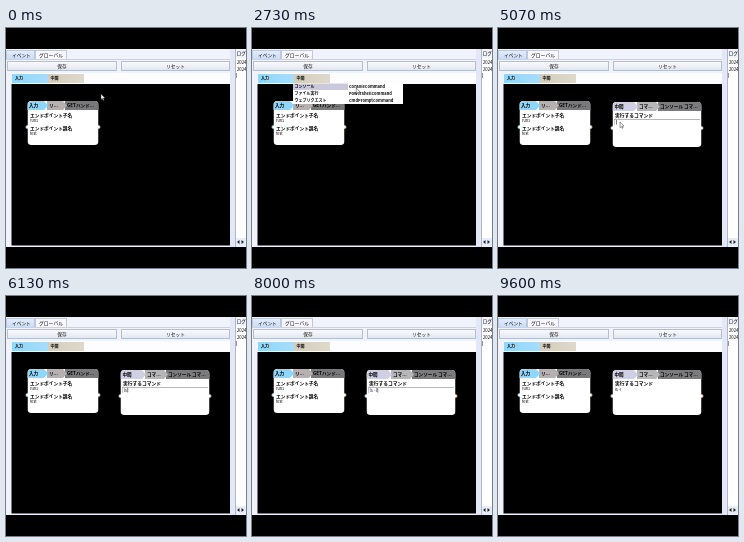
Recreate the animation shown at these times as an HTML page with a canvas. Size 240 by 240 pixels, loop 9670 ms.

```html
<!DOCTYPE html>
<html lang="ja">
<head>
<meta charset="utf-8">
<style>
html, body { margin: 0; width: 100%; height: 100%; overflow: hidden; background: #000; }
canvas { display: block; width: 240px; height: 240px; }
</style>
</head>
<body>
<canvas id="stage" width="240" height="240"></canvas>
<script>
const ctx = document.getElementById('stage').getContext('2d');
const LOOP = 9670;
const FONT = '"Noto Sans CJK JP", "Noto Sans CJK", "Noto Sans", sans-serif';

// Times in ms at which the interface changes.
const MENU_OPEN = 1130, SUBMENU_OPEN = 2130, NODE_ADDED = 3200, EDIT_START = 5000, EDIT_END = 8530;
const KEYS = [[5600, 'l'], [5870, 's'], [6730, ' '], [7070, '-'], [7470, 'l']];
const POINTER = [
  [0, 95, 66], [400, 95, 66], [1000, 52, 51], [1200, 52, 51], [1500, 50, 61], [2000, 54, 59],
  [2500, 104, 60], [3200, 105, 60], [3900, 117, 79], [4500, 117, 79], [5000, 122, 94], [5500, 122, 94]
];

function box(x, y, w, h, fill, stroke) {
  ctx.fillStyle = fill;
  ctx.fillRect(x, y, w, h);
  if (stroke) {
    ctx.strokeStyle = stroke;
    ctx.lineWidth = 1;
    ctx.strokeRect(x + .5, y + .5, w - 1, h - 1);
  }
}

function text(str, x, y, size = 4.7, weight = 500, color = '#000', align = 'left') {
  ctx.font = `${weight} ${size}px ${FONT}`;
  ctx.fillStyle = color;
  ctx.textAlign = align;
  ctx.textBaseline = 'alphabetic';
  ctx.fillText(str, x, y);
}

function gradient(x0, y0, x1, y1, from, to) {
  const g = ctx.createLinearGradient(x0, y0, x1, y1);
  g.addColorStop(0, from);
  g.addColorStop(1, to);
  return g;
}

function button(label, x, w) {
  box(x, 33, w, 10, gradient(0, 33, 0, 43, '#fcfcff', '#dfe5ef'), '#b4bfd0');
  text(label, x + w / 2, 39.5, 4.7, 500, '#111', 'center');
}

function scrollArrow(x, dir) {
  ctx.fillStyle = '#222';
  ctx.beginPath();
  ctx.moveTo(x + dir * 1.5, 214);
  ctx.lineTo(x - dir, 212);
  ctx.lineTo(x - dir, 216);
  ctx.fill();
}

function windowFrame(t) {
  box(0, 0, 240, 240, '#000');
  box(0, 21, 240, 198, '#f0f3fb');
  box(0, 22, 29, 10, gradient(0, 22, 0, 32, '#e5efff', '#c9daf2'), '#bac8dd');
  box(29, 22, 32, 10, '#f7f7fd', '#c3c8d6');
  text('イベント', 6, 28.6);
  text('グローバル', 33, 28.6, 4.8);
  box(0, 31, 225, 1, '#c9d2e4');
  button('保存', 1, 110);
  button('リセット', 115, 109);

  box(6, 45, 218, 11, '#fdfdff');
  box(6, 46, 36, 9, gradient(6, 0, 42, 0, '#8ed7fb', '#a8dcfa'));
  const hover = t > 900 && t < 2100;
  box(42, 46, 36, 9, hover ? '#d5d2d4' : gradient(42, 0, 78, 0, '#d3cdbc', '#dfd9cd'));
  text('入力', 9, 51.5, 4, 700);
  text('中間', 44.5, 51.5, 4, 700);
  box(5.5, 56, 218.5, 161.5, '#000');

  box(224, 21, 5, 198, '#e2e8f8');
  box(229, 21, 1, 198, '#aeb7cc');
  text('ログ', 230.5, 26.7, 4.7);
  box(230, 30, 10, 180, '#fff');
  text('2024-', 231, 36, 4.2);
  text('2024-', 231, 43, 4.2);
  box(230, 45, .5, 5, '#333');
  box(230, 210, 10, 8, '#e6ecf8');
  scrollArrow(232.5, -1);
  scrollArrow(236.5, 1);
}

function node(x, y, w, h, parts) {
  for (const [px, color] of [[x, '#9bd4e8'], [x + w, '#e2a888']]) {
    ctx.beginPath();
    ctx.arc(px, y + 26, 1.6, 0, 7);
    ctx.fillStyle = '#fff';
    ctx.fill();
    ctx.strokeStyle = color;
    ctx.lineWidth = .7;
    ctx.stroke();
  }
  ctx.save();
  ctx.beginPath();
  ctx.roundRect(x, y, w, h, 4);
  ctx.clip();
  box(x, y, w, h, '#fff');
  // Each header segment points over the following one.
  for (const [, start, end, color] of [...parts].reverse()) {
    ctx.fillStyle = color;
    ctx.beginPath();
    ctx.moveTo(start, y);
    ctx.lineTo(end - 3, y);
    ctx.lineTo(end + 1, y + 4.5);
    ctx.lineTo(end - 3, y + 9);
    ctx.lineTo(start, y + 9);
    ctx.fill();
  }
  for (const [label, start] of parts) text(label, start + 2, y + 6.4, 4.6, 700);
  ctx.restore();
}

function inputNode() {
  node(21.5, 73, 71, 44, [
    ['入力', 21, 41, '#91d5f8'], ['リ...', 41, 60, '#b7b0b0'], ['GETハンド...', 59, 97, '#79797c']
  ]);
  text('エンドポイント子名', 24, 88.8, 4.7, 700);
  text('run1', 24, 94, 3.8);
  text('エンドポイント親名', 24, 102, 4.7, 700);
  text('test', 24, 107, 3.8);
}

function commandNode(t) {
  node(114.5, 74, 89, 45, [
    ['中間', 114.5, 139, '#d0d0e4'], ['コマ...', 139, 161, '#b6b6b9'], ['コンソール コマ...', 160, 208, '#7b7b7e']
  ]);
  text('実行するコマンド', 117, 89.2, 4.75, 700);
  const typed = KEYS.filter(([at]) => t >= at).map(([, key]) => key).join('');
  if (t < EDIT_START) return;
  if (t >= EDIT_END) {
    text(typed, 117, 95, 3.8);
    return;
  }
  box(116, 91, 86, 6, '#fff');
  box(116, 91, 86, .7, '#9c91b8');
  box(116, 91, .6, 6, '#aaa4c0');
  text(typed, 117.5, 95.8, 4.7, 500, '#333047');
  const caret = 118 + ctx.measureText(typed).width;
  if (t % 1000 < 500) box(caret, 92, .6, 4.5, '#222');
}

function menuItems(items, x, size) {
  items.forEach((item, i) => text(item, x, 60.3 + i * 6.6, size, 700));
}

function menus(t) {
  if (t < MENU_OPEN || t >= NODE_ADDED) return;
  const open = t >= SUBMENU_OPEN;
  box(41, 55, 56, 21, '#fff');
  if (open) box(41, 55.5, 56, 6.5, '#c9c9db');
  menuItems(['コンソール', 'ファイル実行', 'ウェブリクエスト'], 42.5, 4);
  if (!open) return;
  box(96, 55, 55, 21, '#fff');
  menuItems(['ConsoleCommand', 'PowerShellCommand', 'CmdPromptCommand'], 97, 4);
}

function pointer(t) {
  const i = POINTER.findIndex(p => p[0] > t);
  if (i < 0) return; // hidden once typing starts
  const [t0, x0, y0] = POINTER[i - 1], [t1, x1, y1] = POINTER[i];
  const u = (t - t0) / (t1 - t0), k = u * u * (3 - 2 * u);
  ctx.save();
  ctx.translate(x0 + (x1 - x0) * k, y0 + (y1 - y0) * k);
  const arrow = new Path2D('M0 0V5.6L1.3 4.5L2.2 6.4L3.1 6L2.3 4.1H4Z');
  ctx.fillStyle = '#fff';
  ctx.strokeStyle = '#333';
  ctx.lineWidth = .5;
  ctx.fill(arrow);
  ctx.stroke(arrow);
  ctx.restore();
}

function draw() {
  const t = performance.now() % LOOP;
  windowFrame(t);
  inputNode();
  if (t >= NODE_ADDED) commandNode(t);
  menus(t);
  pointer(t);
  requestAnimationFrame(draw);
}
draw();
</script>
</body>
</html>
```
